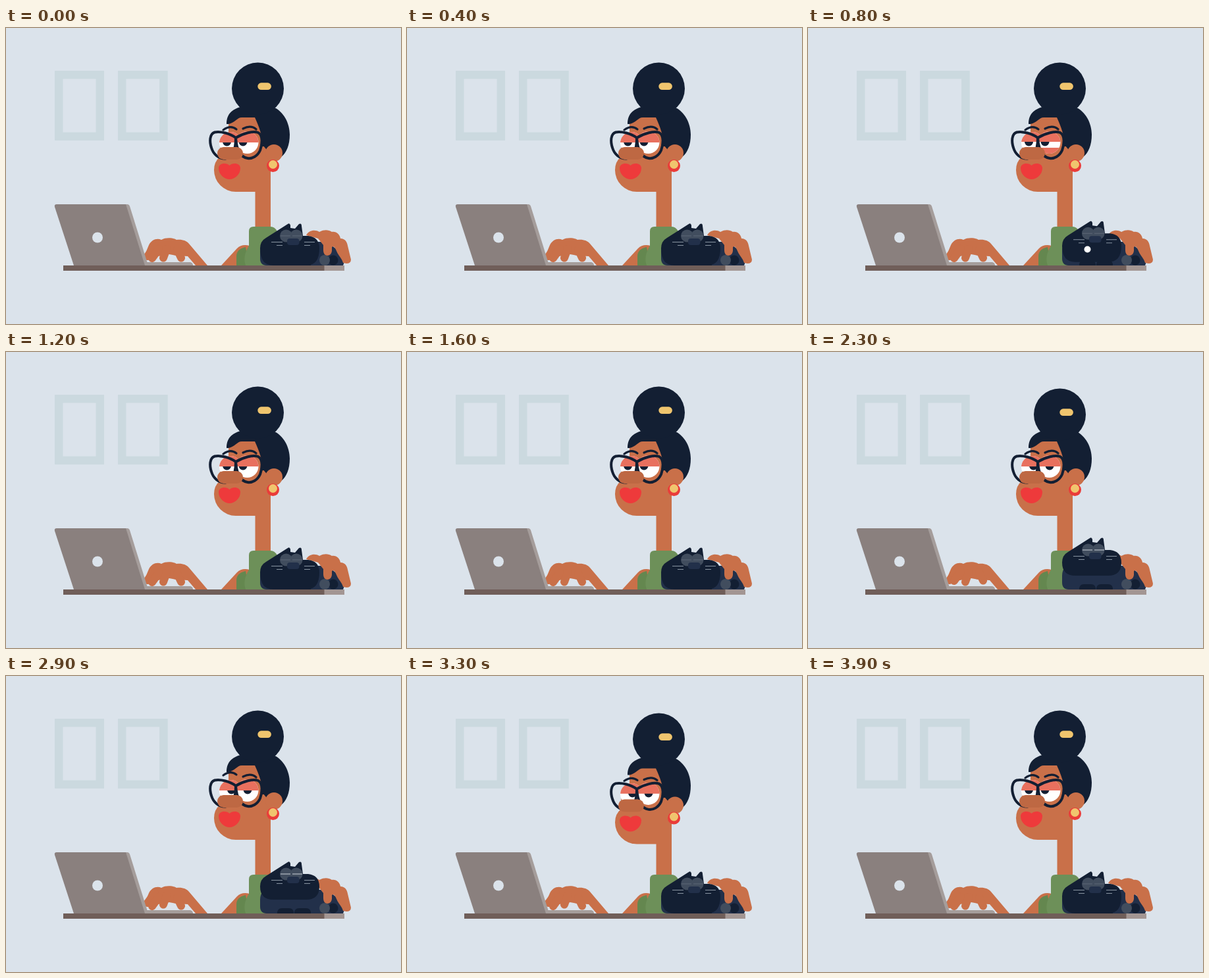
These frames come from a looping animation (600 px wide and 450 px high, 4000 ms). An HTML page:

```html
<!DOCTYPE html>
<html lang="en">
<head>
<meta charset="utf-8">
<style>
  html, body { margin: 0; width: 100%; height: 100%; overflow: hidden; background: #dbe3eb; }
  svg { display: block; width: 600px; height: 450px; }
  .skin { fill: #c97049; }
  .dark { fill: #131f33; }
  .navy { fill: #22304a; }
  .grey { fill: #414d5e; }
  .lid { fill: #e8705e; }
  .line { fill: none; stroke: #131f33; stroke-width: 4; stroke-linecap: round; stroke-linejoin: round; }
  .thin { stroke-width: 3.2; }
  #fingers path { stroke: #c97049; stroke-width: 12; stroke-linecap: round; }
</style>
</head>
<body>
<svg viewBox="0 0 600 450">
  <defs>
    <clipPath id="eyes"><circle cx="341" cy="175" r="17"/><circle cx="366.5" cy="174" r="17"/></clipPath>
  </defs>

  <g fill="none" stroke="#cbd9df" stroke-width="12.5">
    <rect x="80.2" y="71.2" width="62.6" height="93.6"/>
    <rect x="176.2" y="71.2" width="63.2" height="93.6"/>
  </g>

  <!-- woman -->
  <path class="skin" d="M327 361L351 335Q358 328 370 331V361Z"/>
  <path class="skin" d="M378.500 235H402V312H378.500Z"/>
  <path fill="#6d9059" d="M369 361V309Q369 302 376 302H402Q408 302 412 309L420 361Z"/>
  <path fill="#64874f" d="M350 361V347Q350 336 364 333L369 361Z"/>
  <path fill="#6d9059" d="M364 361Q359 347 369 331H380V361Z"/>

  <path id="jaw" class="skin" d="M338 165H398V178H402V249H349A33 33 0 0 1 316 216Q316 203 325 196V178Z"/>
  <g id="hair">
    <path class="skin" d="M338 144L350 133H382L402 180V190H338Z"/>
    <path class="dark" d="M335 146C335 130 344 124 356 120H406C422 127 431 145 431 162C431 178 426 190 418 196L400 190L390 178C390 165 384 149 378 136H358C351 136 348 144 338 146Z"/>
    <g class="line thin">
      <path id="brow" d="M330 155Q341 147 350 154"/>
      <path d="M360 153Q372 147 380 154"/>
    </g>
  </g>
  <g id="bun">
    <circle class="dark" cx="382.5" cy="92" r="39.5"/>
    <rect x="382.3" y="83.3" width="20.6" height="10.8" rx="5.4" fill="#f0c56e"/>
  </g>
  <g id="glasses">
    <g clip-path="url(#eyes)">
      <path fill="#fff" d="M320 155H388V196H320Z"/>
      <g id="pupils" class="dark"><circle cx="335.5" cy="173" r="6.5"/><circle cx="360" cy="173" r="6.5"/></g>
      <rect id="upper" class="lid" x="320" y="150" width="70" height="24"/>
      <rect id="lower" class="lid" x="320" y="196" width="70" height="24"/>
    </g>
    <g class="line">
      <path d="M349 167C340 160 326 157 317 158.5C309 161 309 173 312 182C315 192 323 199 333 198.500C344 197 349 185 349 167"/>
      <path d="M349 167C360 160 376 156 383 159C391 163 389 178 386 186C382 195 374 199 367 198C354 196 350 182 349 167"/>
      <path d="M388 178H399"/>
    </g>
  </g>
  <g id="face">
    <circle class="skin" cx="407" cy="190" r="13"/>
    <circle fill="#ea3c39" cx="405.500" cy="209.500" r="9.500"/>
    <circle fill="#f0c56e" cx="405.500" cy="207.500" r="6.500"/>
    <rect fill="#be6843" x="321" y="181" width="39" height="19" rx="9.500"/>
    <path fill="#ee3a3b" d="M339.500 209C335 204 323 205 323 213C323 223 332 230 339.500 230S356 223 356 213C356 205 344 204 339.500 209Z"/>
  </g>

  <!-- laptop and typing hand -->
  <path fill="#a59d9b" d="M208 356H280Q284 357 284 361H208Z"/>
  <path class="skin" d="M209 349L217 330C221 322 229 319 236 322C243 318 254 319 259 322C267 321 274 323 278 328L306 361H288L276 347L258 346L248 344L225 348Z"/>
  <g id="fingers">
    <path d="M226 332L215 347"/>
    <path d="M232 336L222 350"/>
    <path d="M244 336L239 349.500"/>
    <path d="M260 337L266 349.500"/>
  </g>
  <path fill="#a59d9b" d="M170 268H184Q187 268 188 271L216 361H180Z"/>
  <path fill="#8a807e" d="M77 268H182L211 361H103L74 272Q73 268 77 268Z"/>
  <circle cx="139" cy="318.500" r="8" fill="#dbe3eb"/>
  <path fill="#705e59" d="M87 361H484V369H87Z"/>
  <path fill="#a39693" d="M483.500 361H514V369H483.500Z"/>

  <!-- cat -->
  <path class="navy" d="M386 340Q386 325 400 325H478Q500 328 510 348Q516 354 512 361H396Q386 361 386 350Z"/>
  <g class="dark">
    <path d="M412 361Q412 353 419 353H430Q437 353 437 361ZM438 361Q438 353 445 353H456Q463 353 463 361Z"/>
    <circle cx="497" cy="353" r="7.500"/>
  </g>
  <circle class="grey" cx="484" cy="353" r="8"/>
  <path class="skin" d="M456 315C460 307 470 306 476 310C484 306 490 307 495 310C502 309 507 314 508 320C515 320 518 325 519 331L524 352Q524 358 517 358L512 357C510 350 504 345 502 339C500 334 498 331 495 333V339Q494 346 488 346Q482 345 482 338V330L474 320Z"/>
  <path id="head" class="dark"/>
  <g id="muzzle">
    <circle class="grey" cx="425.500" cy="301" r="9.500"/>
    <circle class="grey" cx="441" cy="301" r="9.500"/>
    <path id="slits" stroke="#cdd4da" stroke-width="1.200" d="M417 301H432M435 301H450"/>
    <rect class="navy" x="427" y="305" width="18.500" height="10" rx="4"/>
    <path stroke="#8995a2" d="M403 310.500H420M411 315.500H420M453 310.500H469M453 315.500H462"/>
  </g>
  <circle id="bubble" cx="424.500" cy="336.500" fill="#fff"/>
</svg>
<script>
const $ = id => document.getElementById(id);
const fingers = [...$('fingers').children];

// Eased value at time t from alternating times and values.
function track(t, ...keys) {
  for (let i = 2; i < keys.length; i += 2) {
    if (t > keys[i]) continue;
    const p = Math.max(0, (t - keys[i - 2]) / (keys[i] - keys[i - 2]));
    return keys[i - 1] + (keys[i + 1] - keys[i - 1]) * p * p * (3 - 2 * p);
  }
  return keys[keys.length - 1];
}

const move = (el, x, y) => el.setAttribute('transform', `translate(${x} ${y})`);

function drawCat(t) {
  const up = track(t, 500, 0, 800, .25, 1200, 0, 1800, 0, 2200, 1, 3000, 1, 3250, 0);
  const y = 15 * (1 - up), bottom = 361 - 21 * up;
  $('head').setAttribute('d', `M386 ${320 + y}Q386 ${309 + y} 395 ${304 + y}
    L428 ${283 + y}Q431 ${281 + y} 432 ${285 + y}V${289 + y}L439 ${290 + y}
    L445 ${283 + y}Q449 ${281 + y} 449 ${286 + y}L451 ${301 + y}H459
    Q476 ${303 + y} 476 ${320 + y}Q476 ${bottom} 456 ${bottom}H406Q386 ${bottom} 386 ${320 + y}Z`);
  move($('muzzle'), 0, y);
  $('slits').setAttribute('opacity', .2 + .8 * track(up, .4, 0, 1, 1));
  $('bubble').setAttribute('r', track(t, 500, 0, 800, 5, 1000, 0));
}

function drawWoman(t) {
  const lift = track(t, 1600, 0, 1800, -6, 1950, -6, 2200, 0, 3050, 0, 3300, 6.5, 3500, -2, 3800, 0);
  const bun = track(t, 1600, 0, 1800, -8, 1950, -8, 2250, 3, 2300, 3, 2500, -1, 2700, 0,
    3050, 0, 3300, 4, 3500, -5, 3900, 0);
  move($('bun'), 0, bun);
  move($('hair'), 0, lift * .7);
  move($('glasses'), 0, lift * .75);
  move($('jaw'), 0, lift);
  move($('face'), 0, lift);

  const squint = track(t, 500, 0, 750, 1, 950, 1, 1200, 0);
  $('upper').setAttribute('height', 24 - squint);
  $('lower').setAttribute('y', 196 - 14 * squint);
  move($('pupils'), track(t, 1900, 0, 2100, 7, 3450, 7, 3650, 0), 0);
  move($('brow'), 0, track(t, 2500, 0, 2750, -4, 2950, -4, 3150, 0));

  const typing = 2 * Math.sin(Math.PI * t / 200) * track(t, 0, 1, 3600, 1, 3800, 0);
  fingers.forEach((f, i) => move(f, 0, -Math.max(0, i % 2 ? -typing : typing)));
}

function frame(now) {
  const t = Math.floor(now % 4000 / 100) * 100;
  drawCat(t);
  drawWoman(t);
  requestAnimationFrame(frame);
}
requestAnimationFrame(frame);
</script>
</body>
</html>
```
